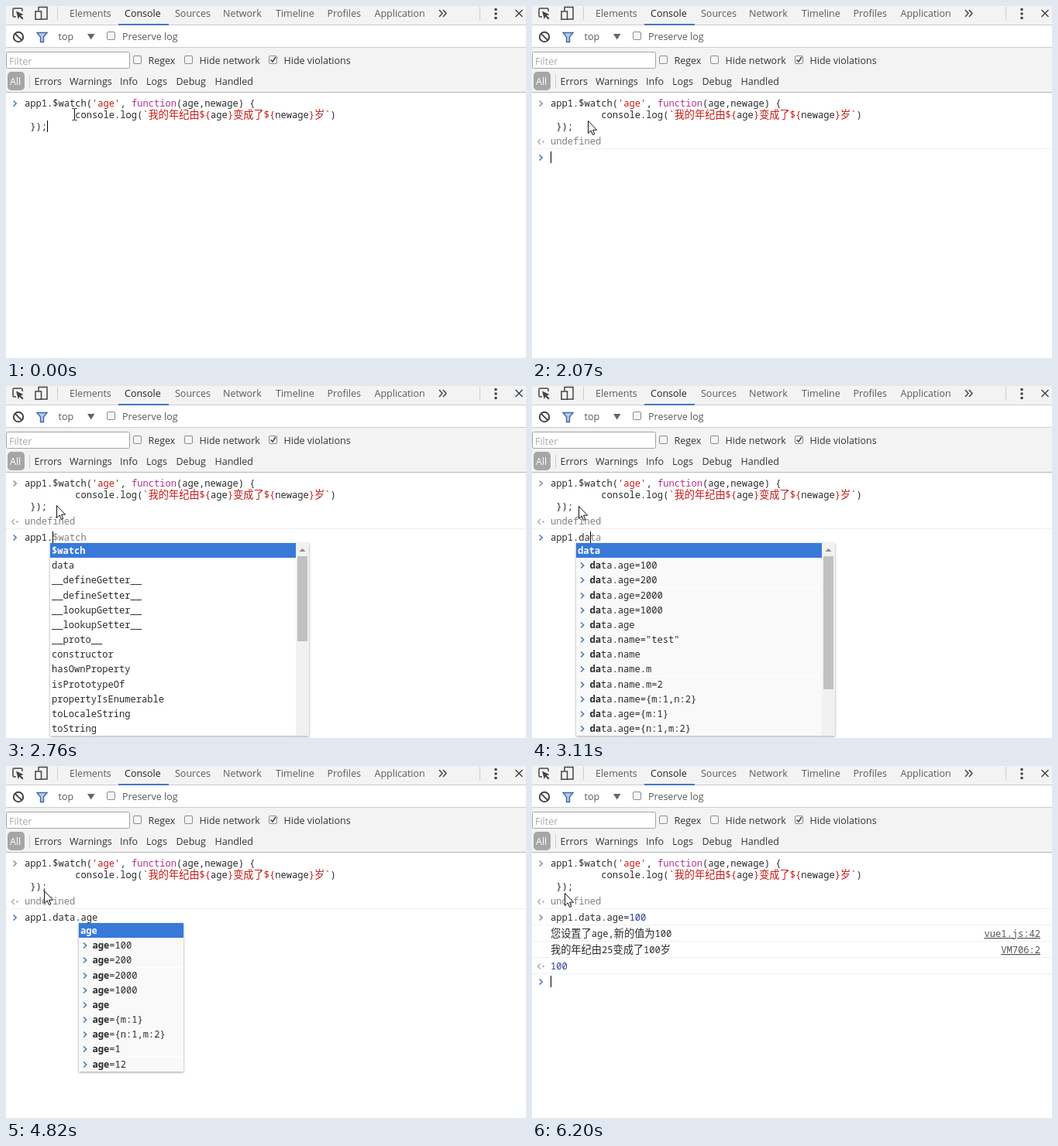
These frames come from a looping animation (671x455 px, 6.53 s). An HTML page:

```html
<!DOCTYPE html>
<html lang="en">
<head>
<meta charset="utf-8">
<title>Console watch demo</title>
<style>
  html, body { margin: 0; width: 100%; height: 100%; overflow: hidden; background: #fff; }
  svg { display: block; }
  text { white-space: pre; }
  .ui { font: 12.5px "Open Sans", "Noto Sans", sans-serif; fill: #333; }
  .soft { fill: #5a5a5a; }
  .code { font: 12.1px "Noto Sans Mono", "DejaVu Sans Mono", monospace; fill: #2a2a2a; }
  .cjk { font: 13.2px "Noto Sans CJK SC", "Noto Sans CJK", sans-serif; }
  .str { fill: #c41a16; }
  .key { fill: #b5308f; }
  .num { fill: #2a3a9c; }
  .dim { fill: #808080; }
  .link { fill: #545454; text-anchor: end; text-decoration: underline; }
  .bold { font-weight: 700; }
  .white { fill: #fff; }
  .line { fill: none; stroke: #444; stroke-width: 1.5; }
  .rule { stroke: #f0f0f0; }
  .box { fill: #f4f4f4; stroke: #8c8c8c; }
  .chev { fill: none; stroke: #4474b8; stroke-width: 1.5; }
  .old { stroke: #8a8a8a; }
  .menu { filter: drop-shadow(0 1px 1.5px rgba(0, 0, 0, .4)); }
</style>
</head>
<body>
<svg width="671" height="455" viewBox="0 0 671 455">
  <defs>
    <path id="chev" d="M-2-3.500 1.700 0-2 3.500"/>
    <rect id="check" class="box" x=".5" y=".5" width="10" height="10" rx="1.5"/>
    <g id="back"><path d="M-1-3.5-4.5 0-1 3.5" fill="none" stroke="#a8a8a8" stroke-width="1.3"/><circle cx="2.5" r="1.2" fill="#a8a8a8"/></g>
  </defs>

  <!-- toolbars -->
  <path d="M0 0H671V24H0ZM0 54H671V111H0Z" fill="#f3f3f3"/>
  <path d="M0 24.5H671M0 53.5H671M66.5 1V18M611.5 1V18M30.5 89V106" stroke="#ccc"/>
  <path d="M0 111.5H671" stroke="#b8b8b8"/>
  <rect x="145" y="23" width="65" height="2" fill="#4577c9"/>
  <path class="line" d="M13 14H10.5Q9 14 9 12.500V4.500Q9 3 10.500 3H19.500Q21 3 21 4.500V7"/>
  <path d="M13 6.500 22.500 11 19 12.300 22.500 16 21 17.500 17.300 13.700 15.800 17Z" fill="#444"/>
  <path class="line" d="M42 6V1.500H53V17H46M38 7H45.500V17.300H38Z"/>
  <g class="ui soft">
    <text x="82" y="14">Elements</text>
    <text x="153" y="14" fill="#222">Console</text>
    <text x="218" y="14">Sources</text>
    <text x="280" y="14">Network</text>
    <text x="348" y="14">Timeline</text>
    <text x="414.500" y="14">Profiles</text>
    <text x="475.500" y="14">Application</text>
    <text x="67.500" y="44">top</text>
    <text x="150" y="44">Preserve log</text>
  </g>
  <path class="line" d="M559 5 563 9.500 559 14M564 5 568 9.500 564 14"/>
  <g fill="#444"><circle cx="632" cy="4.500" r="1.800"/><circle cx="632" cy="10" r="1.800"/><circle cx="632" cy="15.500" r="1.800"/></g>
  <path class="line" d="M657.500 5 666.500 14M666.500 5 657.500 14"/>
  <g class="line" style="stroke-width:2"><circle cx="16" cy="40" r="6.200"/><path d="M11.600 35.600 20.400 44.400"/></g>
  <path d="M40 34.500H53L48.500 40V46.500H44.500V40Z" fill="#b9cbe8" stroke="#3f68a8" stroke-width="1.400"/>
  <path d="M105 36H114.500L109.700 43.500Z" fill="#666"/>
  <use href="#check" x="130" y="33"/>

  <!-- filters -->
  <rect x=".5" y="59.500" width="159" height="21" rx="2" fill="#fff" stroke="#a4a4a4"/>
  <use href="#check" x="164" y="64"/>
  <use href="#check" x="230" y="64"/>
  <use href="#check" x="339" y="64"/>
  <path class="line" d="M341.500 69.500 344 72 348 66"/>
  <rect x="2" y="85" width="22" height="24" rx="5" fill="#a6a6a6"/>
  <g class="ui">
    <text x="4" y="76" style="fill:#a9a9a9">Filter</text>
    <text x="183.500" y="75">Regex</text>
    <text x="249.500" y="75">Hide network</text>
    <text x="358.500" y="75">Hide violations</text>
    <text x="5" y="102" class="white">All</text>
    <text x="36.500" y="102">Errors</text>
    <text x="82" y="102">Warnings</text>
    <text x="147" y="102">Info</text>
    <text x="181" y="102">Logs</text>
    <text x="219.500" y="102">Debug</text>
    <text x="269.500" y="102">Handled</text>
  </g>

  <!-- console -->
  <g class="code">
    <text x="24" y="130">app1.$watch(<tspan class="str">'age'</tspan>, <tspan class="key">function</tspan>(age,newage) {</text>
    <text x="24" y="145">         console.log(<tspan class="str">`<tspan class="cjk">我的年纪由</tspan>${</tspan>age<tspan class="str">}<tspan class="cjk">变成了</tspan>${</tspan>newage<tspan class="str">}<tspan class="cjk">岁</tspan>`</tspan>)</text>
    <g id="sent">
      <use href="#chev" class="chev old" x="11.500" y="126"/>
      <text x="24" y="160"> });</text>
      <use href="#back" x="12" y="175.500"/>
      <text x="24" y="179" class="dim">undefined</text>
      <path class="rule" d="M0 184.500H671"/>
    </g>
    <g id="done">
      <use href="#chev" class="chev old" x="11.500" y="196"/>
      <text x="24" y="200">app1.data.age=<tspan class="num">100</tspan></text>
      <text x="24" y="221"><tspan class="cjk">您设置了</tspan>age,<tspan class="cjk">新的值为</tspan>100</text>
      <text x="656" y="221" class="link">vue1.js:42</text>
      <text x="24" y="242"><tspan class="cjk">我的年纪由</tspan>25<tspan class="cjk">变成了</tspan>100<tspan class="cjk">岁</tspan></text>
      <text x="656" y="242" class="link">VM706:2</text>
      <use href="#back" x="12" y="259"/>
      <text x="24" y="263" class="num">100</text>
      <path class="rule" d="M0 205.500H671M0 226.500H671M0 247.500H671M0 268.500H671"/>
    </g>
    <use id="prompt" href="#chev" class="chev" x="11.500"/>
    <text id="input" x="24"></text>
    <rect id="caret" width="1" height="15" fill="#000"/>
    <g id="menu" class="menu"></g>
  </g>

  <path id="beam" d="M-3-7.500H-1L0-7 1-7.500H3M0-7V7M-3 7.500H-1L0 7 1 7.500H3" fill="none" stroke="#111"/>
  <path id="arrow" d="M.5.5V16.500L4.200 13 6.500 18.500 8.800 17.500 6.500 12.200H11.500Z" fill="#fff" stroke="#111"/>
</svg>
<script>
  const LOOP = 6530, LEFT = 24, ADV = 7.26, ROW = 19.17, TOP = 203;
  const $ = id => document.getElementById(id);
  const list = s => s.split(' ');

  // A leading ">" marks an entry from the history.
  const proto = '__defineGetter__ __defineSetter__ __lookupGetter__ __lookupSetter__ __proto__ constructor ' +
    'hasOwnProperty isPrototypeOf propertyIsEnumerable toLocaleString toString';
  const ages = list('age >age=100 >age=200 >age=2000 >age=1000 >age >age={m:1} >age={n:1,m:2} >age=1 >age=12');
  const menus = {
    a: { x: 21, w: 333, prefix: 'a', thumb: 17, items: list('addEventListener alert applicationCache atob AnalyserNode ' +
      'AnimationEvent AppBannerPromptResult ApplicationCache ApplicationCacheErrorEvent Array ArrayBuffer Attr Audio') },
    app: { x: 57, w: 334, prefix: '', thumb: 110, items: list('$watch data ' + proto) },
    da: { x: 57, w: 334, prefix: 'da', thumb: 172, items: list('data >data.age=100 >data.age=200 >data.age=2000 ' +
      '>data.age=1000 >data.age >data.name="test" >data.name >data.name.m >data.name.m=2 ' +
      '>data.name={m:1,n:2} >data.age={m:1} >data.age={n:1,m:2}') },
    data: { x: 94, w: 170, prefix: '', thumb: 190, items: list('age name ' + proto) },
    ag: { x: 94, w: 135, prefix: 'ag', items: ages },
    age: { x: 94, w: 135, prefix: 'age', items: ages },
    100: { x: 123, w: 71, prefix: '100', items: ['>100', '>1000'] }
  };

  // time, pointer x, pointer y, typed text, caret shown, suggested rest, menu
  const steps = [
    [0, 88.5, 140, ' });', 1],
    [340, 88.5, 141, ' });', 0],
    [690, 80, 143, '', 1],
    [1040, 77, 145, '', 0],
    [1370, 74, 146, '', 0],
    [1720, 73, 147, '', 0],
    [2070, 72, 148, '', 1],
    [2400, 70, 149, 'ap', 1, '', 'a'],
    [2760, 65, 154, 'app1.', 1, '$watch', 'app'],
    [3110, 60, 155, 'app1.da', 1, 'ta', 'da'],
    [3440, 56, 156, 'app1.data.', 1, 'age', 'data'],
    [3790, 52, 159, 'app1.data.ag', 1, 'e', 'ag'],
    [4140, 51, 160, 'app1.data.age', 1, '', 'age'],
    [4470, 49, 160, 'app1.data.age', 0, '', 'age'],
    [4820, 49, 161, 'app1.data.age', 0, '', 'age'],
    [5170, 48, 162, 'app1.data.age=', 1],
    [5500, 44, 164, 'app1.data.age=100', 1, '', '100'],
    [6200, 42, 164, '', 1]
  ];
  const stages = [
    { base: 160, mark: 126 },
    { base: 200, mark: 196 },
    { base: 283, mark: 279 }
  ];

  const rect = (x, y, w, h, fill) => `<rect x="${x}" y="${y}" width="${w}" height="${h}" fill="${fill}"/>`;

  function menuRow(item, i, { x, prefix }, width) {
    const past = item[0] === '>', word = past ? item.slice(1) : item;
    const top = Math.round(TOP + i * ROW), y = top + 14;
    const fill = !i ? '#3879d9' : past ? '#f9f9f9' : '#fff';
    const mark = past ? `<use href="#chev" class="chev" x="${x + 8}" y="${y - 4}" ${i ? '' : 'style="stroke:#fff"'}/>` : '';
    const bold = !i ? word : word.startsWith(prefix) ? prefix : '';
    return rect(x, top, width, 19, fill) + mark +
      `<text x="${x + (past ? 17.5 : 2)}" y="${y}" class="${i ? '' : 'white'}">` +
      `<tspan class="bold">${bold}</tspan>${word.slice(bold.length)}</text>`;
  }

  function menuMarkup(m) {
    const bar = m.thumb ? 17 : 0, h = m.items.length * ROW, right = m.x + m.w - bar;
    const scroll = bar ? rect(right, TOP, bar, h, '#f1f1f1') + rect(right + 2, 220, 13, m.thumb, '#c1c1c1') +
      `<path d="M${right + 4.5} 214H${right + 12.5}L${right + 8.5} 210Z" fill="#8a8a8a"/>` : '';
    return rect(m.x, TOP, m.w, h, '#fff') + scroll +
      m.items.map((item, i) => menuRow(item, i, m, m.w - bar)).join('');
  }

  const show = (id, on) => $(id).style.display = on ? '' : 'none';

  function draw([time, x, y, typed, caret, rest = '', menu]) {
    const stage = time < 690 ? 0 : time < 6200 ? 1 : 2, { base, mark } = stages[stage];
    show('sent', stage > 0);
    show('done', stage > 1);
    show('beam', !stage);
    show('arrow', stage);
    show('caret', caret);
    $(stage ? 'arrow' : 'beam').setAttribute('transform', `translate(${x} ${y})`);
    $('prompt').setAttribute('y', mark);
    $('input').setAttribute('y', base);
    $('input').innerHTML = `${typed}<tspan class="dim">${rest}</tspan>`;
    $('caret').setAttribute('x', Math.round(LEFT + typed.length * ADV));
    $('caret').setAttribute('y', base - 12);
    $('menu').innerHTML = menu ? menuMarkup(menus[menu]) : '';
  }

  let current;
  function tick() {
    const t = performance.now() % LOOP;
    const step = steps.findLast(s => s[0] <= t);
    if (step !== current) draw(current = step);
    requestAnimationFrame(tick);
  }
  tick();
</script>
</body>
</html>
```
